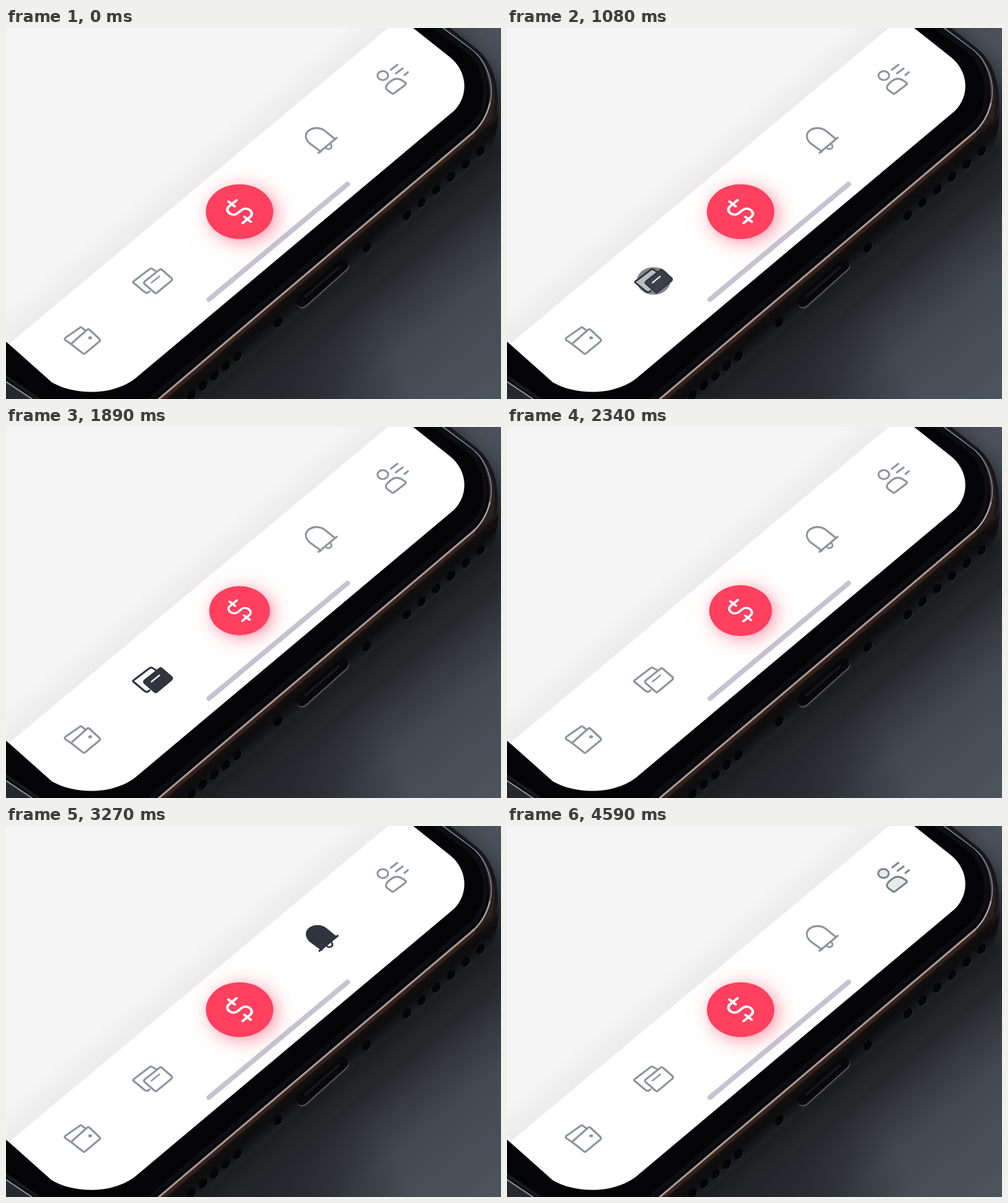
Write an HTML page with a canvas that moves like this. It is 800 px wide and 600 px high and loops after 4.62 s.

```html
<!DOCTYPE html>
<html lang="en">
<head>
<meta charset="utf-8">
<title>Tab bar</title>
<style>
html, body { margin: 0; width: 100%; height: 100%; overflow: hidden; background: #25272b; }
canvas { display: block; width: 800px; height: 600px; }
</style>
</head>
<body>
<canvas id="stage" width="800" height="600"></canvas>
<script>
const LOOP = 4620;
const RIPPLE = 280;
const LINE = 3.1;
const ctx = document.getElementById('stage').getContext('2d');
const backdrop = document.createElement('canvas');
backdrop.width = 800;
backdrop.height = 600;

const IDLE = [143, 148, 156], ACTIVE = [47, 52, 62];
const clamp = v => Math.max(0, Math.min(1, v));
const smooth = v => { v = clamp(v); return v * v * (3 - 2 * v); };
const mix = (a, b, k) => a + (b - a) * k;
const tint = k => `rgb(${IDLE.map((v, i) => Math.round(mix(v, ACTIVE[i], k)))})`;

function stops(gradient, ...pairs) {
  for (const [at, color] of pairs) gradient.addColorStop(at, color);
  return gradient;
}

function fillPath(c, d, style) {
  c.fillStyle = style;
  c.fill(new Path2D(d));
}

function strokePath(c, d, style, width) {
  c.strokeStyle = style;
  c.lineWidth = width;
  c.stroke(new Path2D(d));
}

function glow(c, x, y, r, rgb, alpha) {
  c.fillStyle = stops(c.createRadialGradient(x, y, 0, x, y, r),
    [0, `rgba(${rgb},${alpha})`], [0.45, `rgba(${rgb},${alpha * 0.65})`], [1, `rgba(${rgb},0)`]);
  c.fillRect(0, 0, 800, 600);
}

function drawHoles(c, from, to, count) {
  for (let i = 0; i < count; i++) {
    const k = count > 1 ? i / (count - 1) : 0;
    const x = mix(from[0], to[0], k), y = mix(from[1], to[1], k);
    for (const [d, color] of [[1, '#2b2d31'], [0, '#050506']]) {
      c.beginPath();
      c.ellipse(x + d, y + d, 6, 9, 0.6, 0, 7);
      c.fillStyle = color;
      c.fill();
    }
  }
}

function drawBackdrop(c) {
  c.lineCap = c.lineJoin = 'round';
  c.fillStyle = stops(c.createLinearGradient(560, 400, 752, 631),
    [0, '#212326'], [0.13, '#25272b'], [0.27, '#33373d'], [0.48, '#424951'], [1, '#4c545e']);
  c.fillRect(0, 0, 800, 600);
  glow(c, 420, 640, 240, '33,36,40', 0.9);
  glow(c, 810, -10, 210, '82,90,102', 0.95);

  // Side wall and rounded corner of the phone
  const wall = 'M0 0H715L766 44C806 85 804 181 771 210L314 600H0Z';
  c.save();
  c.shadowColor = 'rgba(20,21,24,.7)';
  c.shadowBlur = 26;
  c.shadowOffsetX = 4;
  c.shadowOffsetY = 8;
  fillPath(c, wall, '#18191c');
  c.restore();
  c.save();
  c.clip(new Path2D(wall));
  c.fillStyle = stops(c.createLinearGradient(500, 385, 528, 418),
    [0, '#2d211f'], [0.25, '#120e0d'], [0.5, '#0d0d0f'], [1, '#1f2124']);
  c.fillRect(0, 0, 800, 600);
  c.restore();
  drawHoles(c, [300, 594], [374, 531], 5);
  drawHoles(c, [440, 476], [440, 476], 1);
  drawHoles(c, [583, 355], [583, 355], 1);
  drawHoles(c, [648, 303], [767, 199], 6);

  // Charging port
  strokePath(c, 'M479 444L545 385', '#5b5354', 19);
  strokePath(c, 'M478 442L544 383', '#08080a', 19);
  strokePath(c, 'M484 434L538 387', '#17181c', 4);

  // Glass and metal rim
  const glass = 'M0 0H706L752 34C782 57 795 133 758 168L250 600H0Z';
  fillPath(c, glass, '#040406');
  strokePath(c, 'M695 0L748 38C782 68 786 130 750 161L236 598', '#0d0e13', 7);
  strokePath(c, 'M252 600L755 173', '#33221e', 8);
  strokePath(c, 'M247 600L756 168', '#a89892', 3.2);
  strokePath(c, 'M706 0L752 34C780 56 789 95 782 122', '#747c8b', 2);
  strokePath(c, 'M782 122Q775 150 756 168', '#aaa3a5', 2.6);
  strokePath(c, 'M714 0L762 38C789 62 797 108 789 142', '#15171b', 5);
  fillPath(c, 'M0 570L45 600H0Z', '#25282e');
  strokePath(c, 'M0 572L42 600', '#8d929b', 2);
  strokePath(c, 'M0 564L52 600', '#17191f', 5);

  // Screen and tab bar
  const screen = 'M0 0H658L716 46C746 69 749 109 724 134L211 565C175 595 112 595 74 573L0 507Z';
  c.save();
  c.clip(new Path2D(screen));
  c.fillStyle = '#fff';
  c.fillRect(0, 0, 800, 600);
  fillPath(c, 'M0 0H617L0 515Z', stops(c.createLinearGradient(314, 253, 284, 217),
    [0, '#ececec'], [0.35, '#efefef'], [0.7, '#f2f2f3'], [1, '#f5f5f5']));
  c.restore();
  strokePath(c, 'M328 439L552 252.5', '#c5c3d0', 8);
}

function drawWallet(c, k) {
  const body = 'M105 511L131 488Q133 486 135 488L151 503Q153 505 151 507L128 526Q126 528 124 526L105 511Z';
  strokePath(c, 'M105 511L96 505Q94 503 96 501L119 485Q121 483 123 485L128 489', tint(k), LINE);
  c.globalAlpha = k;
  fillPath(c, body, tint(k));
  c.globalAlpha = 1;
  strokePath(c, body, tint(k), LINE);
  c.beginPath();
  c.ellipse(136, 501, 3, 2.6, 0, 0, 7);
  c.fillStyle = k > 0.5 ? '#fff' : tint(k);
  c.fill();
}

function drawCards(c, k) {
  const back = 'M207 409L232 390Q234 388 237 390L250 399L229 428L206 412Q204 411 207 409Z';
  const front = 'M224 410L248 391Q250 389 252 391L268 405Q269 407 267 409L244 428Q242 430 240 428L224 414Q222 412 224 410Z';
  c.globalAlpha = 0.45;
  fillPath(c, back, '#fff');
  c.globalAlpha = 1;
  strokePath(c, 'M232 426L229 428Q227 429 224 427L206 412Q204 411 207 409L232 390Q234 388 237 390L242 393', tint(k), LINE);
  fillPath(c, front, '#fff');
  c.globalAlpha = k;
  fillPath(c, front, tint(k));
  c.globalAlpha = 1;
  strokePath(c, front, tint(k), LINE);
  strokePath(c, 'M235 412L248 401.5', k > 0.5 ? '#fff' : tint(k), 2.3);
}

function drawBell(c, k) {
  const dome = 'M509 200L490 186C483 179 483 171 489 166C497 160 508 161 515 166L531 179';
  c.translate(1.5 * k, 0);
  c.globalAlpha = k;
  fillPath(c, dome + 'Z', tint(k));
  c.globalAlpha = 1;
  strokePath(c, dome, tint(k), LINE);
  strokePath(c, 'M505 202L534.5 177.5', tint(k), LINE);
  strokePath(c, 'M517 194C520 198 527 195 526 191Q526 189 524 188', tint(k), 2.7);
}

function drawPerson(c, k) {
  const color = tint(k);
  const body = 'M624 106L617 101C611 97 615 91 622 86C629 80 635 82 639 84L645 88Q648 90 645 92L628 105Q626 107 624 106Z';
  const head = new Path2D();
  head.ellipse(609 - 3 * k, 77 - 1.5 * k, 8.6, 7.2, 0, 0, 7);
  c.fillStyle = color;
  c.globalAlpha = k;
  c.fill(head);
  fillPath(c, body, color);
  c.globalAlpha = 1;
  c.lineWidth = LINE;
  c.strokeStyle = color;
  c.stroke(head);
  strokePath(c, body, color, LINE);
  strokePath(c, `M${622 + 4 * k} ${67.5 - 3 * k}L632.5 59.5M${630 + 7 * k} ${73.5 - 5 * k}L641 65.5M644 76L649.5 71.5`, color, LINE);
}

const tabs = [
  { x: 124, y: 504, on: 20, off: 850, fade: 200, draw: drawWallet },
  { x: 237, y: 409, on: 985, off: 2000, fade: 240, draw: drawCards },
  { x: 507, y: 183, on: 2640, off: 3640, fade: 230, draw: drawBell },
  { x: 625, y: 82, on: 3680, off: 4430, fade: 220, draw: drawPerson }
];

function drawTab(t, { x, y, on, off, fade, draw }) {
  const p = (t - on) / RIPPLE;
  const k = smooth((t - on) / 110) * (1 - smooth((t - off) / fade));
  if (p > 0 && p < 1) {
    const r = 48 * (1 - (1 - p) ** 2);
    ctx.beginPath();
    ctx.ellipse(x, y, r, r * 0.82, 0, 0, 7);
    ctx.fillStyle = `rgba(47,52,62,${0.9 * (1 - p)})`;
    ctx.fill();
  }
  ctx.save();
  const size = 1 - 0.06 * Math.sin(Math.PI * clamp((t - on) / RIPPLE));
  ctx.translate(x, y);
  ctx.scale(size, size);
  ctx.translate(-x, -y);
  draw(ctx, k);
  ctx.restore();
}

// Button scale over time: [ms, scale]
const press = [[1700, 1], [1890, 0.9], [2060, 0.87], [2340, 0.93], [2600, 1]];

function pressScale(t) {
  if (t <= press[0][0]) return 1;
  for (let i = 1; i < press.length; i++) {
    const [t0, s0] = press[i - 1], [t1, s1] = press[i];
    if (t < t1) return mix(s0, s1, (t - t0) / (t1 - t0));
  }
  return 1;
}

function drawButton(t) {
  const s = pressScale(t);
  glow(ctx, 383, 302, 112, '255,64,95', 0.03);
  ctx.save();
  ctx.translate(377.5, 297);
  ctx.scale(s, s);
  ctx.shadowColor = 'rgba(255,64,95,.52)';
  ctx.shadowBlur = 27 * s;
  ctx.shadowOffsetX = 6 * s;
  ctx.shadowOffsetY = 5 * s;
  ctx.beginPath();
  ctx.ellipse(0, 0, 54.5, 44.3, 0, 0, 7);
  ctx.fillStyle = '#ff405f';
  ctx.fill();
  ctx.shadowColor = 'transparent';
  ctx.transform(0.696, -0.581, 0.718, 0.564, 0, 0);
  strokePath(ctx, 'M13 -19.5H-4C-17 -19.5 -17 0 -4 0H4C17 0 17 19.5 4 19.5H-13M2 -27V-13M-2 13V27', '#fff', 4.4);
  ctx.restore();
}

function frame(now) {
  const t = now % LOOP;
  ctx.drawImage(backdrop, 0, 0);
  ctx.lineCap = ctx.lineJoin = 'round';
  drawButton(t);
  for (const tab of tabs) drawTab(t, tab);
}

drawBackdrop(backdrop.getContext('2d'));
const start = performance.now();
function tick(now) {
  frame(Math.max(0, now - start));
  requestAnimationFrame(tick);
}
requestAnimationFrame(tick);
</script>
</body>
</html>
```
